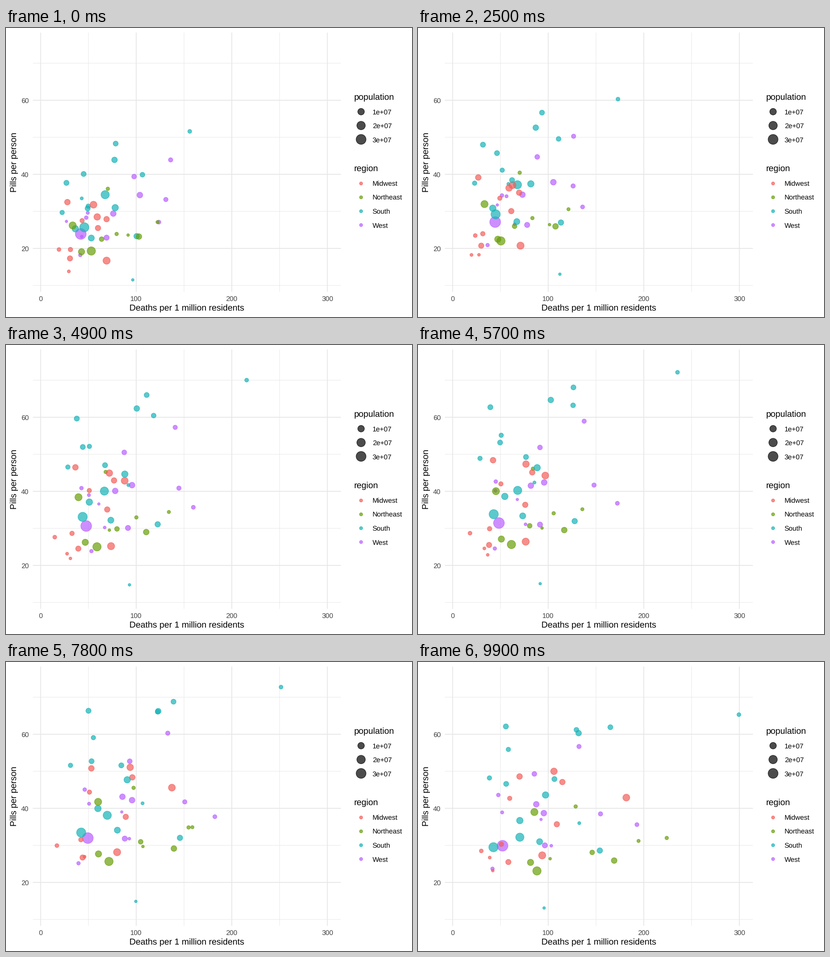
Write a matplotlib script that moves like this. It is 885 by 632 pixels and loops after 10 s.

```python
import numpy as np
import matplotlib.pyplot as plt
from matplotlib.animation import FuncAnimation
from matplotlib.colors import to_rgba

W, H, DPI, FRAMES = 885, 632, 100, 100
PX = 72 / DPI  # points per pixel
plt.rcParams.update({"font.family": "Liberation Sans", "text.hinting": "no_hinting",
                     "text.hinting_factor": 1})

# Per region: colour, how late deaths climb, how far pills rise above trend
REGIONS = {
    "Midwest": ("#F35E5A", 2.0, 0.165),
    "Northeast": ("#689E08", 3.0, 0.2),
    "South": ("#17B3B7", 1.2, 0.22),
    "West": ("#B960FF", 0.85, 0.155),
}
MW, NE, S, WE = REGIONS
ALPHA = 0.7

U = np.linspace(0, 1, 9)              # nine yearly records
YEARS = np.round(U * (FRAMES - 1))    # frame on which each year lands
rng = np.random.default_rng(7)
tracks, areas, colors = [], [], []


def px(deaths):
    return 75.5 + 2.0835 * deaths


def py(pills):
    return 644 - 8.1 * pills


def point_area(size):
    radius = 0.375 * (2.845 * size + 0.945) * 1.75
    return (2 * radius * PX) ** 2


def pop_area(millions):
    return point_area(1 + 5 * np.sqrt(max(millions - 0.52, 0) / 37.5))


def state(region, millions, first, last, missing=()):
    """One bubble going from (deaths, pills) in the first year to the last."""
    color, late, bump = REGIONS[region]
    (x0, y0), (x1, y1) = first, last
    deaths = x0 + (x1 - x0) * U ** late
    # counting noise: small states jump more from year to year
    noise = rng.normal(size=U.size) * np.sqrt(deaths / millions)
    noise[[0, -1]] = 0
    pills = y0 + (y1 - y0) * U
    pills = pills * (1 + bump * np.sin(np.pi * U ** 1.4))

    frames = np.arange(FRAMES)
    x = px(np.interp(frames, YEARS, np.maximum(deaths + noise, 6)))
    y = py(np.interp(frames, YEARS, pills))
    for i in missing:
        before = YEARS[i - 1] if i else -1
        x[(frames > before) & (frames < YEARS[i + 1])] = -99
    tracks.append(np.column_stack([x, y]))
    areas.append(pop_area(millions))
    colors.append(color)


# population in millions, then (deaths, pills) at both ends
state(S, 4.8, (27, 37.7), (55.7, 62.1))
state(WE, .71, (43, 23.2), (103.2, 29.9))
state(WE, 6.4, (76, 29.4), (87.5, 41.1))
state(S, 2.9, (49.8, 31.4), (58.3, 55.9))
state(WE, 37.5, (42, 23.9), (52.2, 29.9))
state(WE, 5, (69, 22.9), (96.5, 30))
state(NE, 3.6, (63.8, 22.5), (146, 28.1))
state(S, .9, (43, 33.5), (132.5, 36))
state(S, .6, (96.4, 11.5), (95.7, 13.1))
state(S, 18.8, (67.5, 34.5), (70.3, 32.2))
state(S, 9.7, (36.3, 25.3), (70.3, 36.7))
state(WE, 1.36, (41.5, 18.2), (41.7, 23.7))
state(WE, 1.57, (47.7, 28.3), (47.8, 43.6))
state(MW, 12.8, (69, 16.7), (93.7, 27.3))
state(MW, 6.5, (28, 32.5), (70, 48.6))
state(MW, 3.05, (31.2, 19.7), (51, 30.3))
state(MW, 2.85, (43.4, 27.5), (59.7, 42.7))
state(S, 4.35, (78.5, 48.3), (165, 61.9))
state(S, 4.5, (45, 40.1), (56, 46.6))
state(NE, 1.33, (70.3, 36.1), (128.7, 40.5))
state(S, 5.8, (100.4, 23.3), (154, 28.6))
state(NE, 6.5, (102.8, 23.2), (169, 25.9))
state(MW, 9.9, (59.2, 28.5), (106, 50))
state(MW, 5.3, (30.7, 17.3), (58.3, 25.5))
state(S, 2.97, (22.5, 29.7), (38.5, 48.2))
state(MW, 6, (69, 27.9), (114.8, 47.1))
state(WE, .99, (49.3, 29.6), (51.8, 38.9))
state(MW, 1.83, (19.2, 19.7), (30, 28.5))
state(WE, 2.7, (136, 43.9), (132.2, 56.7))
state(NE, 1.32, (79.5, 23.9), (224, 32))
state(NE, 8.8, (42.8, 19.1), (81.5, 25.4))
state(WE, 2.06, (123.7, 27.1), (192.8, 35.6))
state(NE, 19.4, (53, 19.3), (88.2, 23.1))
state(S, 9.5, (78, 31), (97.2, 43.6))
state(MW, .69, (29, 15), (42, 23.2), missing=(0, 6))
state(MW, 11.5, (55.3, 31.8), (181.7, 42.9))
state(S, 3.75, (106.5, 39.9), (129.5, 61.2))
state(WE, 3.8, (97.8, 39.4), (85.5, 49.3))
state(NE, 12.7, (33.5, 26.2), (85.5, 39))
state(NE, 1.05, (122.3, 27.1), (194.5, 31.2))
state(S, 4.65, (49.2, 30.8), (106.5, 47.9))
state(MW, .82, (29.5, 13.8), (38.8, 26.7))
state(S, 6.35, (77.3, 43.9), (131.8, 60.3))
state(S, 25.2, (45.7, 25.7), (42.7, 29.5))
state(WE, 2.77, (131, 33.2), (154.7, 38.5))
state(NE, .63, (91.5, 23.6), (102, 26.4))
state(S, 8, (53, 22.8), (91, 31))
state(WE, 6.7, (103.8, 34.4), (95.4, 38.7))
state(S, 1.85, (156, 51.6), (299.5, 65.3))
state(MW, 5.7, (60, 25.5), (109, 35.7))
state(WE, .56, (27, 27.3), (92.5, 37))
tracks = np.array(tracks)

fig = plt.figure(figsize=(W / DPI, H / DPI), dpi=DPI, facecolor="white")
ax = fig.add_axes([0, 0, 1, 1])
ax.set(xlim=(0, W), ylim=(H, 0))
ax.axis("off")

LEFT, RIGHT, TOP, BOTTOM = 58.5, 730, 10, 577
GREY = "#404040"


def line(xs, ys, width):
    ax.plot(xs, ys, color="#E7E7E7", lw=width * PX, solid_capstyle="butt",
            snap=False, zorder=1)


def label(x, y, text, size=15.4, color="black", **kw):
    ax.text(x, y, text, fontsize=size * PX, color=color, va="baseline", **kw)


def dots(xy, sizes, fills):
    rgba = [to_rgba(c, ALPHA) for c in fills]
    x, y = np.transpose(xy)
    return ax.scatter(x, y, s=sizes, facecolors=rgba, edgecolors=rgba,
                      linewidths=1.24 * PX, zorder=3)


for v in range(0, 301, 50):
    major = v % 100 == 0
    line([px(v)] * 2, [TOP, BOTTOM], 1.87 if major else 0.95)
    if major:
        label(px(v), 596.5, str(v), color=GREY, ha="center")
for v in range(10, 71, 10):
    major = v % 20 == 0
    line([LEFT, RIGHT], [py(v)] * 2, 1.87 if major else 0.95)
    if major:
        label(49.5, py(v) + 5.8, str(v), color=GREY, ha="right")

label(394, 618.5, "Deaths per 1 million residents", 19.3, ha="center")
label(23.5, 293.5, "Pills per person", 19.3, ha="center",
      rotation=90, rotation_mode="anchor")
label(758.5, 157, "population", 19.3)
label(758.5, 313.5, "region", 19.3)

keys = [(183 + 30.3 * i, f"{i + 1}e+07", pop_area(10 * (i + 1)), "black")
        for i in range(3)]
keys += [(340 + 30.3 * i, name, point_area(1.5), REGIONS[name][0])
         for i, name in enumerate(REGIONS)]
for y, text, *_ in keys:
    label(798.8, y + 5.8, text)
dots([(774, k[0]) for k in keys], [k[2] for k in keys], [k[3] for k in keys])

bubbles = dots(tracks[:, 0], areas, colors)


def draw(frame):
    bubbles.set_offsets(tracks[:, frame])
    return [bubbles]


anim = FuncAnimation(fig, draw, frames=FRAMES, interval=100, repeat=True,
                     repeat_delay=0, blit=False)
plt.show()
```
